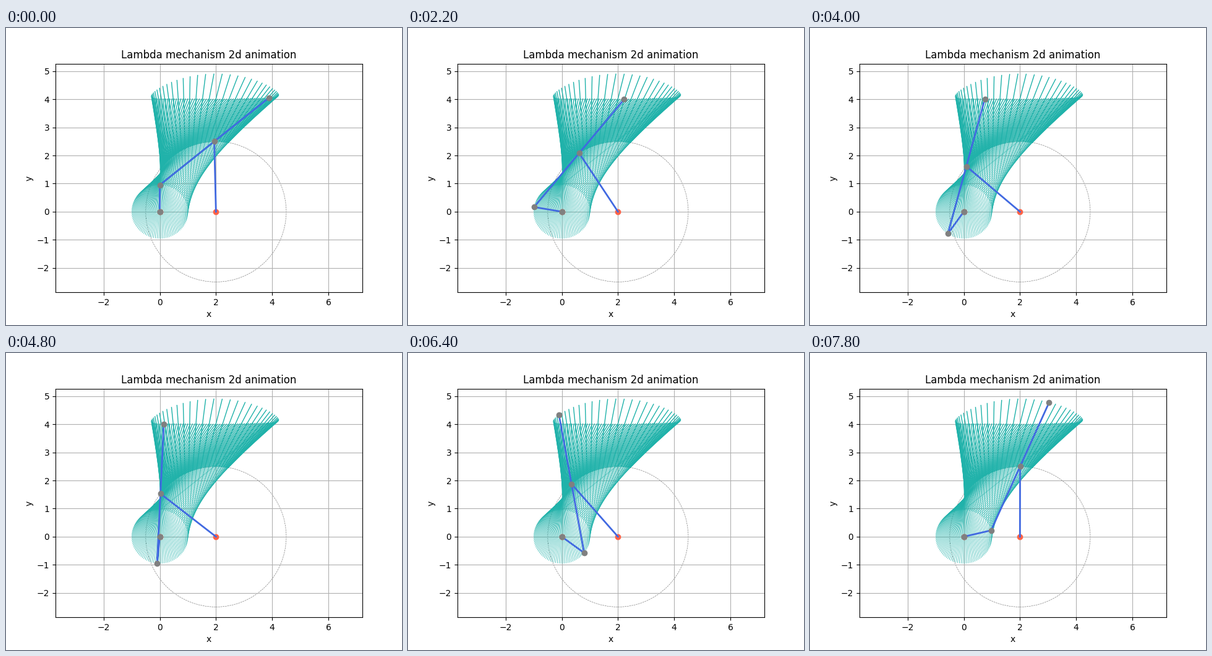
A matplotlib script that plays this animation: 640x480 px, repeating every 8 s.

```python
import numpy as np
import matplotlib.pyplot as plt
from matplotlib.animation import FuncAnimation

plt.rcParams["text.kerning_factor"] = 6

CRANK, BASE, ARM = 1.0, 2.0, 2.5
TILT = np.pi / 10            # the crank's plane leans out of the page
FRAMES, INTERVAL = 40, 200
POSES = np.linspace(0, 2 * np.pi, 100)

ORIGIN = np.array([0.0, 0.0])
PIVOT = np.array([BASE, 0.0])


def joints(turn):
    """Crank pin, coupler middle and coupler tip, projected on the page."""
    angle = np.pi / 2 + turn
    depth = CRANK * np.sin(angle) * np.sin(TILT)
    pin = CRANK * np.array([np.cos(angle), np.sin(angle) * np.cos(TILT)])
    reach2 = ARM**2 - depth**2
    gap = PIVOT - pin
    dist = np.hypot(*gap)
    along = (reach2 - ARM**2 + dist**2) / (2 * dist)
    height = np.sqrt(reach2 - along**2)
    ux, uy = gap / dist
    mid = pin + along * np.array([ux, uy]) + height * np.array([-uy, ux])
    return pin, mid, 2 * mid - pin


def path(*points):
    return np.array(points).T


fig, ax = plt.subplots(figsize=(6.4, 4.8), dpi=100)
ax.set_title("Lambda mechanism 2d animation")
ax.set_xlabel("x")
ax.set_ylabel("y")
ax.grid(True)
ax.axis("equal")

ax.add_patch(plt.Circle(PIVOT, ARM, fill=False, ec="gray", ls="--", lw=0.5))
for turn in POSES:
    pin, mid, tip = joints(turn)
    ax.plot(*path(pin, mid), color="lightseagreen", lw=0.5)
    ax.plot(*path(mid, tip), color="lightseagreen", lw=1)

ax.plot(*path(ORIGIN, PIVOT), "o", color="tomato")
coupler, = ax.plot(*path(ORIGIN, ORIGIN), color="royalblue", lw=2)
rocker, = ax.plot(*path(PIVOT, PIVOT), color="royalblue", lw=2)
pins, = ax.plot(*path(ORIGIN, PIVOT), "o", color="gray")


def update(frame):
    pin, mid, tip = joints(POSES[2 * frame])
    coupler.set_data(*path(ORIGIN, pin, tip))
    rocker.set_data(*path(PIVOT, mid))
    pins.set_data(*path(ORIGIN, pin, mid, tip))
    return coupler, rocker, pins


anim = FuncAnimation(fig, update, frames=FRAMES, interval=INTERVAL,
                     repeat=True, repeat_delay=0, blit=False)
plt.show()
```
